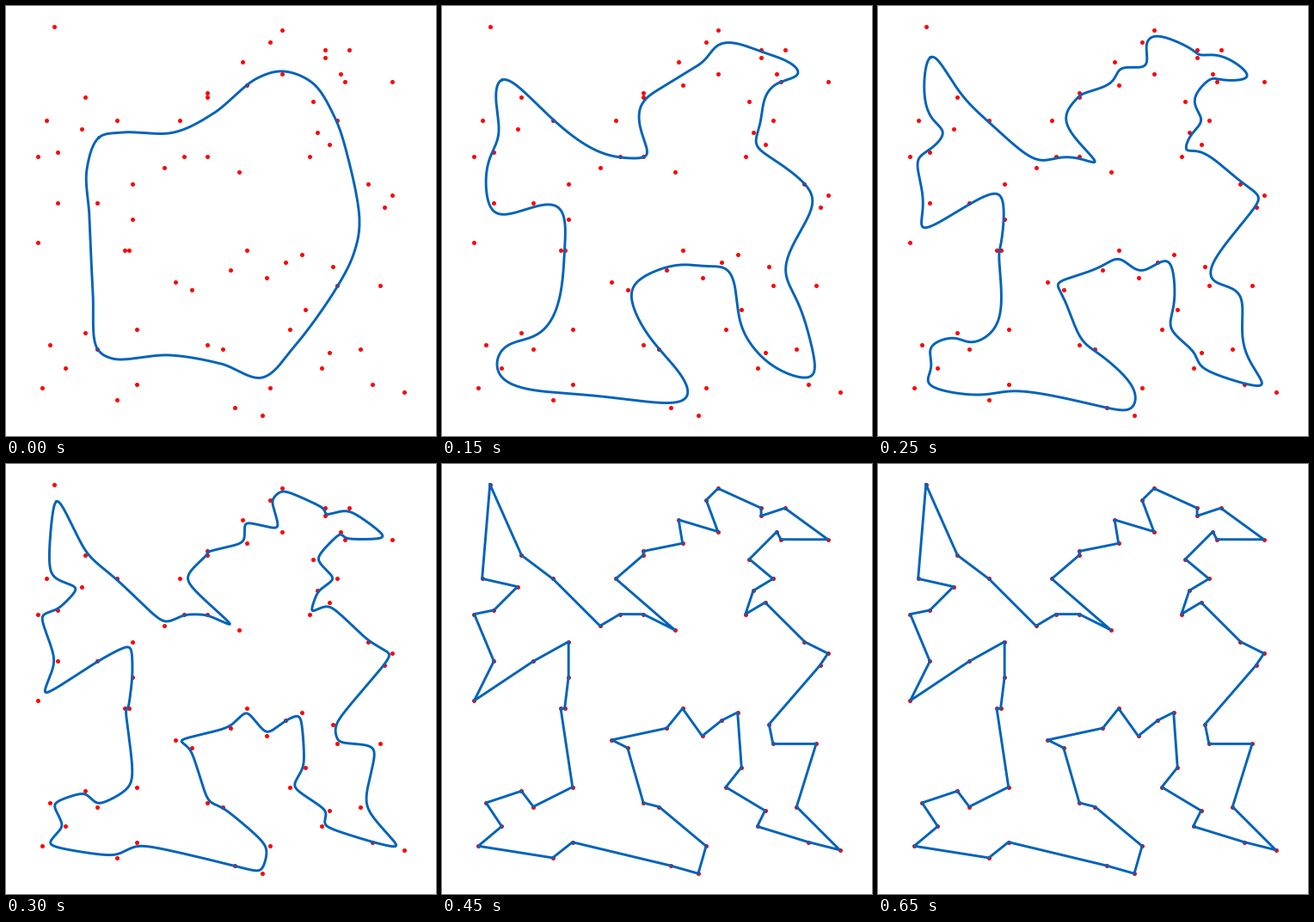
A matplotlib script for the animation above (1650 ms loop, 500 by 500 pixels).

```python
import numpy as np
import matplotlib.pyplot as plt
from matplotlib.animation import FuncAnimation

SIZE, DPI = 500, 100
FRAMES, INTERVAL = 33, 50
NODES_PER_CITY = 40

# Cities on a 100 x 100 grid, in visiting order
CITIES = np.array([
    (9, 100), (17, 82), (25, 76), (37, 64), (42, 67), (48, 67), (56, 63),
    (41, 76), (48, 82), (48, 83), (58, 85), (57, 91), (67, 88), (64, 96),
    (67, 99), (78, 94), (78, 92), (84, 94), (95, 86), (83, 86), (82, 88),
    (75, 81), (81, 76), (76, 73), (74, 67), (79, 70), (89, 60), (95, 57),
    (93, 54), (80, 39), (81, 34), (92, 34), (87, 18), (98, 7), (90, 9),
    (77, 13), (79, 17), (69, 23), (73, 28), (72, 42), (68, 40), (63, 36),
    (58, 43), (54, 38), (40, 35), (44, 33), (48, 19), (52, 18), (64, 8),
    (62, 1), (55, 3), (30, 9), (25, 5), (6, 8), (12, 13), (8, 19), (17, 22),
    (20, 18), (30, 23), (27, 43), (28, 43), (29, 51), (29, 60), (20, 55),
    (5, 45), (10, 55), (5, 67), (10, 68), (16, 74), (7, 76)])
TOUR = 250 + (CITIES - (51.5, 50.5)) * (4.57, -4.57)
N = len(TOUR)

# Starting band: city index on the tour -> where the band lies
START = {
    0: (108, 153), 2: (135, 147), 4: (195, 147), 7: (241, 125),
    11: (292, 84), 14: (323, 76), 17: (357, 90), 21: (382, 129),
    24: (396, 170), 28: (411, 250), 29: (405, 286), 31: (386, 325),
    33: (336, 395), 35: (298, 432), 40: (250, 416), 45: (190, 406),
    50: (124, 410), 54: (106, 398), 58: (101, 335), 62: (97, 245),
    66: (94, 190),
}

U = np.linspace(0, N, N * NODES_PER_CITY + 1)
GAP = (U[:, None] - np.arange(N) + N / 2) % N - N / 2


def start_band():
    """Closed centripetal Catmull-Rom curve through the starting points."""
    tags = np.array(list(START))
    p = np.array(list(START.values()), float)
    prev, nxt = np.roll(p, 1, axis=0), np.roll(p, -1, axis=0)
    after = np.sqrt(np.hypot(*(nxt - p).T))[:, None]
    before = np.roll(after, 1, axis=0)
    slope = (p - prev) / before - (nxt - prev) / (before + after) + (nxt - p) / after
    a, b = after * slope, after * np.roll(slope, -1, axis=0)

    k = np.searchsorted(tags, U, side="right") - 1
    t = ((U - tags[k]) / np.diff(tags, append=N)[k])[:, None]
    ease = t * t * (3 - 2 * t)
    return ((1 - ease) * p[k] + ease * nxt[k]
            + t * (1 - t)**2 * a[k] - t * t * (1 - t) * b[k])


def smooth_tour(radius):
    """Each node sits at the Gaussian mean of the cities near it on the tour."""
    weight = np.exp(-0.5 * (GAP / radius)**2)
    return weight @ TOUR / weight.sum(axis=1, keepdims=True)


BAND = start_band()

fig = plt.figure(figsize=(SIZE / DPI, SIZE / DPI), dpi=DPI, facecolor="white")
ax = fig.add_axes([0, 0, 1, 1])
ax.set_xlim(0, SIZE)
ax.set_ylim(SIZE, 0)
ax.axis("off")
ax.scatter(*TOUR.T, color="red", s=13, linewidths=0, zorder=1)
line, = ax.plot([], [], color="#0063ba", lw=2.1, zorder=2)


def update(frame):
    radius = max(0.1, 2.2 * 0.78**frame)
    slack = max(0, 1 - frame / 3)**2
    path = slack * BAND + (1 - slack) * smooth_tour(radius)
    line.set_data(*path.T)
    return line,


anim = FuncAnimation(fig, update, frames=FRAMES, interval=INTERVAL, repeat=True)
plt.show()
```
